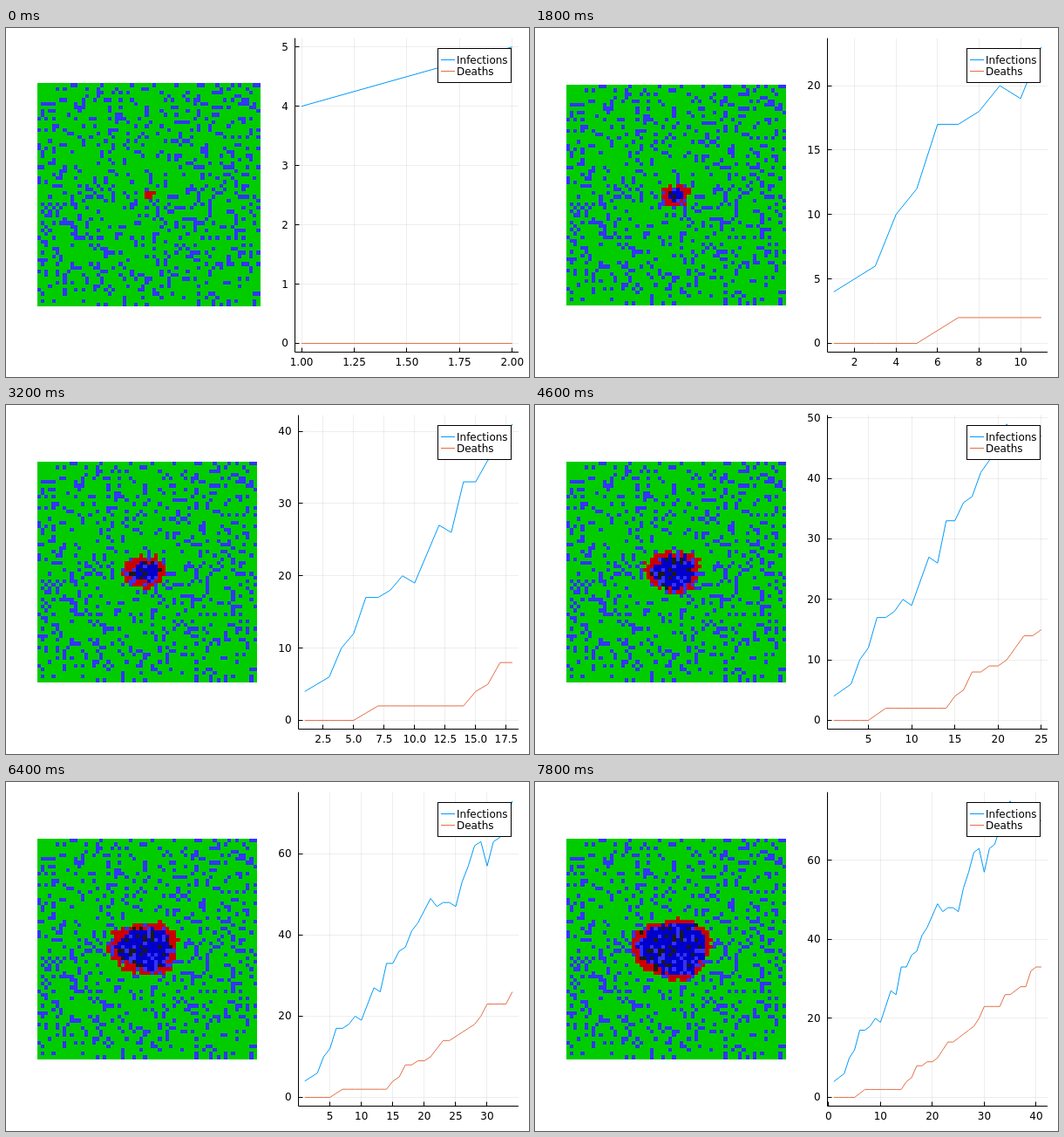
An HTML page with a canvas for the animation above (8000 ms loop, 600x400 px).

```html
<!DOCTYPE html>
<html lang="en">
<head>
<meta charset="utf-8">
<title>Epidemic simulation</title>
<style>
html, body { margin: 0; width: 100%; height: 100%; overflow: hidden; background: #fff; }
canvas { display: block; }
</style>
</head>
<body>
<canvas id="stage" width="600" height="400"></canvas>
<script>
const ctx = document.getElementById('stage').getContext('2d');

const infections = [4, 5, 6, 10, 12, 17, 17, 18, 20, 19, 23, 27, 26, 33, 33, 36, 37, 41, 43, 46, 49,
  47, 48, 48, 47, 53, 57, 62, 63, 57, 63, 64, 68, 73, 75, 72, 70, 72, 69, 71, 70];
const deaths = [0, 0, 0, 0, 0, 1, 2, 2, 2, 2, 2, 2, 2, 2, 4, 5, 8, 8, 9, 9, 10,
  12, 14, 14, 15, 16, 17, 18, 20, 23, 23, 23, 23, 26, 26, 27, 28, 28, 32, 33, 33];

const SIZE = 60, STEP_MS = 200, DAYS = infections.length;
const RIGHT = 588, TOP = 11.6, BOTTOM = 371.65, PAD = 0.03;
const BLUE = '#009afa', ORANGE = '#e36f47';
const VACCINATED = 1, SICK = 2, IMMUNE = 3, DEAD = 4;
const cellColors = ['#00cc00', '#3333ff', '#cc0000', '#0000cc', '#1a1a1a'];

let seed = 20;
function random() {
  seed = (seed + 0x6d2b79f5) | 0;
  let t = Math.imul(seed ^ (seed >>> 15), 1 | seed);
  t = (t + Math.imul(t ^ (t >>> 7), 61 | t)) ^ t;
  return ((t ^ (t >>> 14)) >>> 0) / 4294967296;
}

// The disease spreads outwards through the unvaccinated cells in a ragged ellipse.
function simulate() {
  const cells = new Uint8Array(SIZE * SIZE), spread = [];
  cells.forEach((_, i) => {
    const dx = i % SIZE - 29.8, dy = (Math.floor(i / SIZE) - 29.4) * 1.25;
    const dist = Math.hypot(dx, dy), angle = Math.atan2(dy, dx);
    const vaccinated = random() < 0.19, noise = random();
    if (dist < 1.35) spread.push({ i, when: dist });
    else if (vaccinated) cells[i] = VACCINATED;
    else spread.push({ i, when: dist * (1.1 + 0.12 * Math.cos(angle) + 0.07 * Math.sin(3 * angle + 1)) + 1.6 * noise });
  });
  spread.sort((a, b) => a.when - b.when);

  const history = [], sick = [];
  let reached = 0;
  for (let day = 2; day <= DAYS; day++) {
    const target = infections[day - 1], newDeaths = deaths[day - 1] - deaths[day - 2];
    const total = Math.max(Math.round(0.9 * day ** 1.5), reached + target - sick.length + newDeaths);
    for (let k = 0; k < newDeaths; k++) {
      const victim = Math.floor(random() * sick.length * 0.6);
      cells[sick.splice(victim, 1)[0]] = DEAD;
    }
    for (; reached < total; reached++) {
      cells[spread[reached].i] = SICK;
      sick.push(spread[reached].i);
    }
    while (sick.length > target) cells[sick.shift()] = IMMUNE;
    history.push(cells.slice());
  }
  return history;
}

// Picks the round step with the best mix of tick count, coverage and niceness.
function ticks(lo, hi) {
  const niceness = [[1, 1], [5, 0.9], [2.5, 0.5], [2, 0.7], [3, 0.2]];
  let best = { score: -1 };
  for (const power of [0.1, 1, 10]) {
    for (const [base, nice] of niceness) {
      const step = base * power;
      const first = Math.ceil(lo / step - 1e-9), last = Math.floor(hi / step + 1e-9);
      const count = last - first + 1;
      if (count < 4 || count > 8) continue;
      const score = 0.25 * (1 - Math.abs(count - 5) / 5) + 0.5 * (hi - lo) / ((count - 1) * step) + 0.25 * nice;
      if (score > best.score + 1e-9) best = { score, step, first, count };
    }
  }
  const { step, first, count } = best;
  const digits = step % 1 === 0 ? 0 : step * 10 % 1 === 0 ? 1 : 2;
  return Array.from({ length: count }, (_, k) => {
    const value = (first + k) * step;
    return { value, label: value.toFixed(digits) };
  });
}

function line(color, ...points) {
  ctx.strokeStyle = color;
  ctx.beginPath();
  points.forEach(([x, y]) => ctx.lineTo(x, y));
  ctx.stroke();
}

function text(label, x, y, align) {
  ctx.fillStyle = '#000';
  ctx.textAlign = align;
  ctx.fillText(label, x, y);
}

function drawMap(cells, width) {
  const left = 35.5, top = 191.4 - width / 2, size = width / SIZE;
  const edge = (origin, k) => Math.round(origin + k * size);
  cells.forEach((state, i) => {
    const col = i % SIZE, row = Math.floor(i / SIZE);
    const x = edge(left, col), y = edge(top, row);
    ctx.fillStyle = cellColors[state];
    ctx.fillRect(x, y, edge(left, col + 1) - x, edge(top, row + 1) - y);
  });
}

function drawLegend() {
  ctx.fillStyle = '#fff';
  ctx.fillRect(495.5, 23.5, 84, 39);
  ctx.strokeStyle = '#000';
  ctx.strokeRect(495.5, 23.5, 84, 39);
  line(BLUE, [499, 36.5], [515, 36.5]);
  line(ORANGE, [499, 49.5], [515, 49.5]);
  text('Infections', 517, 41, 'left');
  text('Deaths', 517, 54, 'left');
}

function drawChart(day, max, xTicks, yTicks, width) {
  const left = RIGHT - width, height = BOTTOM - TOP;
  const px = v => left + width * ((v - 1) / (day - 1) + PAD) / (1 + 2 * PAD);
  const py = v => BOTTOM - height * (v / max + PAD) / (1 + 2 * PAD);
  const snap = v => Math.floor(v) + 0.5;
  const axisX = snap(left), axisY = snap(BOTTOM);
  const grid = 'rgba(0,0,0,0.065)';

  for (const { value, label } of xTicks) {
    const x = snap(px(value));
    line(grid, [x, TOP], [x, axisY]);
    line('#000', [x, axisY], [x, axisY - 5]);
    text(label, px(value), 387, 'center');
  }
  for (const { value, label } of yTicks) {
    const y = snap(py(value));
    line(grid, [axisX, y], [RIGHT, y]);
    line('#000', [axisX, y], [axisX + 5, y]);
    text(label, left - 8, py(value) + 4, 'right');
  }
  line('#000', [axisX, TOP], [axisX, axisY], [RIGHT, axisY]);

  const curve = series => series.slice(0, day).map((v, k) => [px(k + 1), py(v)]);
  line(BLUE, ...curve(infections));
  line(ORANGE, ...curve(deaths));
  drawLegend();
}

const history = simulate();

function draw(now) {
  const index = Math.floor(now / STEP_MS) % history.length, day = index + 2;
  const max = Math.max(...infections.slice(0, day));
  const xTicks = ticks(1 - PAD * (day - 1), day + PAD * (day - 1));
  const yTicks = ticks(-PAD * max, max * (1 + PAD));

  ctx.fillStyle = '#fff';
  ctx.fillRect(0, 0, 600, 400);
  ctx.font = '12px "DejaVu Sans", sans-serif';
  ctx.lineWidth = 1;
  // Both panels share the room that the widest y label leaves.
  const labelWidth = Math.max(...yTicks.map(t => ctx.measureText(t.label).width));
  const width = 260 - labelWidth / 2;
  drawMap(history[index], width);
  drawChart(day, max, xTicks, yTicks, width);
}

const start = performance.now();
(function loop() {
  draw(performance.now() - start);
  requestAnimationFrame(loop);
})();
</script>
</body>
</html>
```
